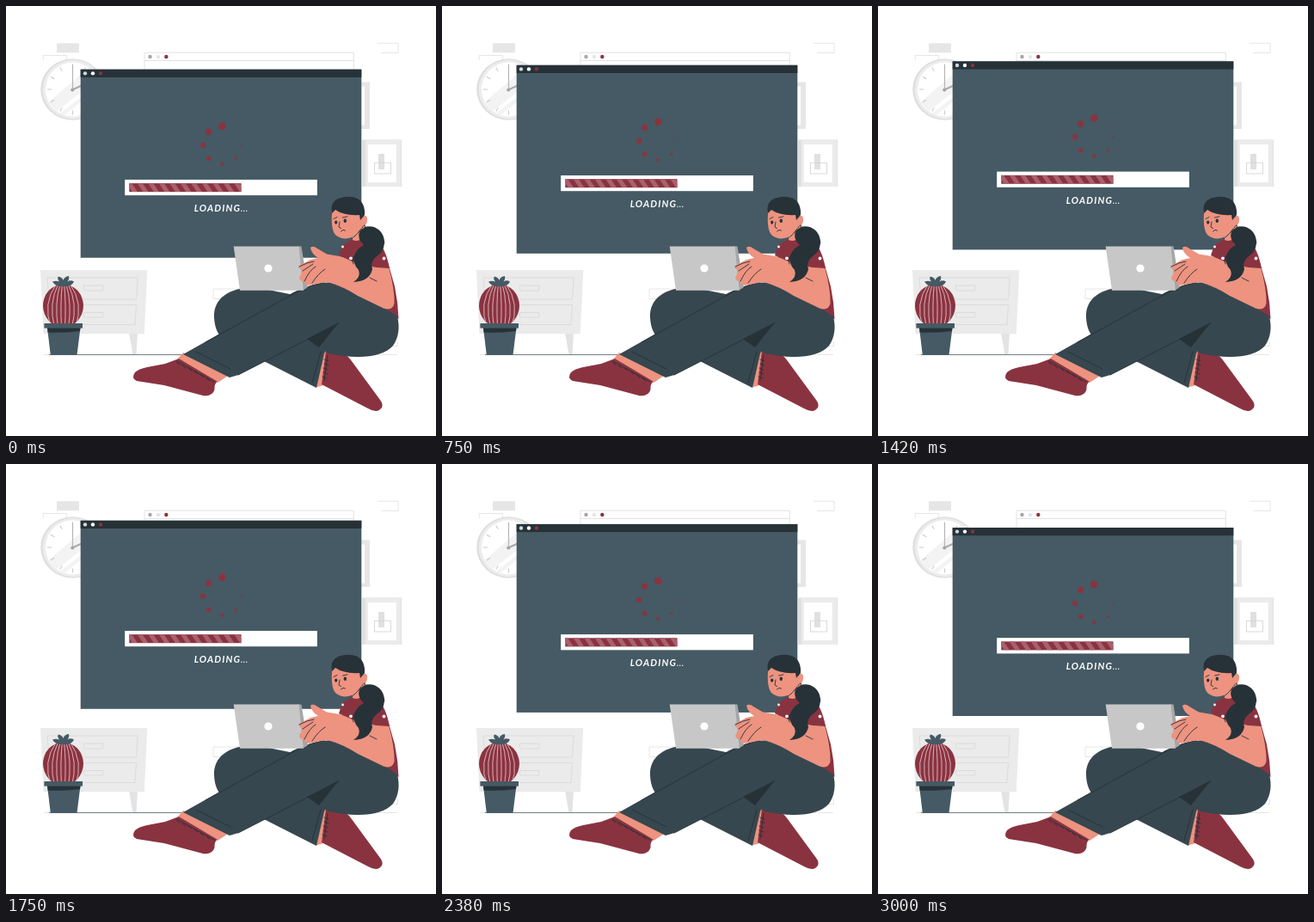
Write an HTML page that moves like this. It is 500 px wide and 500 px high and loops after 3040 ms.

```html
<!DOCTYPE html>
<html lang="en">
<head>
<meta charset="utf-8">
<title>Loading</title>
<style>
  html, body { margin: 0; width: 100%; height: 100%; overflow: hidden; background: #fff; }
  svg { display: block; width: 100vw; height: 100vh; }
  .red { fill: #8a3340; }
  .slate { fill: #455a64; }
  .ink { fill: #263238; }
  .pants { fill: #37474f; }
  .skin { fill: #ed9380; }
  .pale { fill: #ebebeb; }
  .white { fill: #fff; }
  .line { fill: none; stroke: #263238; stroke-width: .9; stroke-linecap: round; stroke-linejoin: round; }
  .faint { fill: none; stroke: #e0e0e0; stroke-width: .8; }
  .label { font: italic 700 11px Lato, "Open Sans", sans-serif; letter-spacing: 1.1px; fill: #fff; }
  .dots { font-weight: 400; letter-spacing: .3px; }
</style>
</head>
<body>
<svg viewBox="0 0 500 500">
  <defs>
    <clipPath id="face"><circle cx="77.5" cy="97" r="31"/></clipPath>
    <clipPath id="fill"><rect x="143.3" y="206.4" width="130.2" height="10"/></clipPath>
    <clipPath id="ball"><ellipse cx="66.5" cy="348.5" rx="23.5" ry="25"/></clipPath>
  </defs>

  <!-- wall -->
  <rect x="59" y="43.3" width="26" height="11" fill="#e6e6e6"/>
  <path class="faint" d="M43.3 63V57.5H70.7V63M432 43.3H456V54.5H436"/>
  <path class="faint" d="M272 340.5H241V329H272M455.5 390V395.5H446"/>

  <!-- clock -->
  <ellipse cx="77.5" cy="97" rx="37.3" ry="35.8" fill="#dfdfdf"/>
  <ellipse cx="78" cy="97" rx="35.3" ry="34.2" fill="#ededed"/>
  <circle class="white" cx="77.5" cy="97" r="31.5"/>
  <g clip-path="url(#face)" fill="#f3f3f3">
    <path d="M48 113L97 71L109 83L57 124Z"/>
    <path d="M60 127L112 87V92L64 130Z"/>
  </g>
  <g id="ticks" stroke="#c9c9c9" stroke-width="1"></g>
  <path d="M77.5 98V68" stroke="#b5b5b5" stroke-width="1.2"/>
  <path d="M77 97.5L89 92" stroke="#aaa" stroke-width="2"/>
  <circle cx="77.3" cy="97.5" r="2.1" fill="#a6a6a6"/>

  <!-- picture frames -->
  <rect x="400" y="88.5" width="23" height="54.5" fill="#e6e6e6"/>
  <rect class="white" x="400" y="93.5" width="17" height="45"/>
  <rect x="414" y="155.5" width="46" height="54.5" fill="#e0e0e0"/>
  <rect class="pale" x="418" y="155.5" width="41" height="54.5"/>
  <rect class="white" x="420.7" y="161" width="33" height="44"/>
  <rect x="433" y="172" width="7" height="18" fill="#e0e0e0"/>
  <rect x="428.5" y="182.3" width="19" height="12.7" fill="none" stroke="#d6d6d6" stroke-width=".9"/>

  <!-- back window -->
  <path d="M161 90V54.2H404.3V90M161 63.5H404.3" fill="#fff" stroke="#e0e0e0" stroke-width=".9"/>
  <circle cx="167.5" cy="59" r="2.2" fill="#a6a6a6"/>
  <circle cx="177" cy="59" r="2.2" fill="#e6e6e6"/>
  <circle class="red" cx="186.3" cy="59" r="2.2"/>

  <!-- dresser -->
  <path d="M143 380H153L151.5 405.3H147.5ZM49 380H58L56 405H52Z" fill="#e3e3e3"/>
  <path class="pale" d="M40 307H164.3L160.8 381.3H43.5Z"/>
  <path fill="none" stroke="#dadada" stroke-width=".9"
    d="M48 316H153.3L151.5 341H50ZM48.5 347.5H151.5L150 370.5H51ZM90 325H113L112.5 331H91ZM90 356.5H113L112.5 362H91Z"/>

  <path d="M44 405.5H455" stroke="#e0e0e0" stroke-width=".8"/>
  <path d="M50 405.5H400" stroke="#59656b" stroke-width=".8"/>

  <!-- cactus -->
  <ellipse class="red" cx="66.5" cy="348.5" rx="23.5" ry="25"/>
  <g id="ribs" clip-path="url(#ball)" fill="none" stroke="#e3bfc4" stroke-width=".9"></g>
  <path class="slate" d="M66.5 326Q58 327 54 320.5Q58 319 62 320.5Q59 317 61 314.5Q66 316 66.5 319Q68 314.5 73 314Q74 317 71.5 320.5Q75 318 79 320.5Q76 327 66.5 326Z"/>
  <path class="slate" d="M48 374H86.5L82.5 405.7H51.8Z"/>
  <path class="ink" d="M48 374H86.5L86 378Q65 380.5 48.6 379.6Z"/>
  <rect class="slate" x="44.4" y="369" width="44.6" height="5.6"/>

  <!-- floating window -->
  <g id="window">
    <rect class="slate" x="86.7" y="74" width="326.6" height="219"/>
    <rect class="ink" x="86.7" y="74" width="326.6" height="9.2"/>
    <circle cx="92" cy="78.6" r="2.2" fill="#cfd8dc"/>
    <circle class="white" cx="101" cy="78.6" r="2.2"/>
    <circle class="red" cx="110" cy="78.6" r="2.2"/>
    <g id="spinner" class="red"></g>
    <rect class="white" x="138.2" y="202.2" width="223.7" height="18.2"/>
    <rect class="red" x="143.3" y="206.4" width="130.2" height="10"/>
    <g id="stripes" clip-path="url(#fill)" fill="#a8616c"></g>
    <text class="label" x="218.8" y="239.2">LOADING<tspan class="dots">...</tspan></text>
  </g>

  <!-- far leg -->
  <path class="skin" d="M369 400L360 443.5L368 441.5L378 402Z"/>
  <path class="pants" d="M290 327C258 327 241 341 242 362C243 386 258 399 298 412L361 444L370 404L388 368L330 335Z"/>
  <path class="red" d="M372 401L392 404Q398 407 402 413L435 458Q441 466 433 470.5Q428 472 421 468L367 440Z"/>
  <path class="line" d="M374 406L370 436M370 411L375 413M370 416L375 418M369 421L374 423M369 426L374 428M368 431L373 433" stroke-width=".6"/>

  <!-- torso -->
  <path class="red" d="M391 278L408 268L430 271Q440 283 446 305L452 326Q456 345 456.5 364L420 346L410 302Z"/>

  <!-- near leg -->
  <path class="skin" d="M206 403L258 430L246 438L199 411Z"/>
  <path class="pants" d="M206 405L334 333Q358 321 381 321C404 324 425 340 455 361C458 373 457 385 450 395C438 409 408 411 375 404L350 388L270 429L260 432Z"/>
  <path class="ink" d="M350 387L387 368L364 397Z"/>
  <path class="line" d="M232 391L330 337Q350 325 370 321.5M221 402L261 422M366 402L356 438M270 429L387 369"/>
  <path class="red" d="M201 410L245.5 436.5Q242 440 242.5 446Q240 454.5 229 453L184 441L152 436Q145 433 150 426Q154 422 164 420L185 416Z"/>
  <path class="line" d="M199 413L242 437M198 414l4 3M205 418l4 3M212 421l4 3M219 425l4 3M226 429l4 3M233 433l4 3" stroke-width=".6"/>

  <!-- laptop -->
  <path fill="#a6a6a6" d="M339 279.5H343.5L351 327L345 330.7Z"/>
  <path fill="#c7c7c7" d="M264.7 279.5H340.5L345.8 330.7H272Z"/>
  <circle class="white" cx="305" cy="305" r="4.6"/>

  <!-- arm -->
  <path class="skin" d="M354 281Q357 278 362 282L373 288.5L388 291L424 301L445 304Q452 329 451.5 346Q449 355 439 351.5L409 337Q392 326 374 321Q364 322 357 324Q350 326 347 323L348 320Q342 321 341 316Q344 310 345 307Q339 306 341 302L354 295L363 293Q355 288 354 281Z"/>
  <path class="line" d="M341 303Q350 298 358 297M345 308L357 300M347 320Q353 307 360 303M356 322Q363 311 371 306M423 316L431 320"/>
  <path class="red" d="M391 278L387 290Q416 305 446 305Q441 280 430 271L408 268Z"/>
  <g class="white">
    <circle cx="401" cy="293.3" r="1.9"/>
    <circle cx="439.5" cy="293.5" r="1.9"/>
    <circle cx="391.5" cy="280" r="1.4"/>
  </g>

  <!-- head -->
  <path class="skin" d="M404 262L418 252L417 268Q411 275 403 272Z"/>
  <path class="skin" d="M379.5 236Q377 259 383 266Q391 273 402 269Q413 264 417 249L415 236Z"/>
  <ellipse class="skin" cx="416.3" cy="250" rx="3.6" ry="6.5" transform="rotate(14 416 250)"/>
  <path class="ink" d="M378.5 237Q378 224 394 222Q415 220 417 238V243L412 249L411 243Q393 244 383 237L379 241Z"/>
  <path class="ink" d="M411 262Q418 254 428 257Q440 262 440 276Q439 286 431 291Q423 297 426 306Q423 320 404 321Q413 315 410 307Q402 298 405 290Q409 281 416 278Q408 271 411 262Z"/>
  <path class="line" d="M414 258Q420 249 416 264M419 257Q437 259 440 275M404 269Q409 265 413 259M410 287Q400 292 404 300"/>
  <g class="ink">
    <ellipse cx="383.7" cy="251.6" rx="1.6" ry="2.1"/>
    <ellipse cx="394.3" cy="249.7" rx="1.7" ry="2.2"/>
  </g>
  <path class="line" stroke-width="1.2" d="M381 247.5L385 245.5M391.5 246L397 244.8M388 251L387 257L389.5 258.5M389.5 262Q392 259 394.5 261"/>
</svg>
<script>
const LOOP = 3040, LEAD = 40, RISE = 10;
const $ = id => document.getElementById(id);

function add(parent, tag, attrs) {
  const node = document.createElementNS("http://www.w3.org/2000/svg", tag);
  for (const key in attrs) node.setAttribute(key, attrs[key]);
  $(parent).append(node);
}

for (let i = 0; i < 12; i++) {
  add("ticks", "path", { d: "M77.5 67.5v5", transform: `rotate(${i * 30} 77.5 97)` });
}

// Spinner dots shrink counterclockwise from the top.
const dotRadii = [4.2, 3.6, 3.1, 2.7, 2.1, 1.6, 1, .4];
dotRadii.forEach((r, i) => {
  const a = -Math.PI / 2 - i * Math.PI / 4;
  add("spinner", "circle", { cx: 251.3 + 22.2 * Math.cos(a), cy: 162 + 22 * Math.sin(a), r });
});

for (let x = 127.5; x < 274; x += 12.5) {
  add("stripes", "path", { d: `M${x} 206h6l7 10.5h-6z` });
}

for (let i = -3.5; i <= 3.5; i++) {
  const top = 66.5 + i * 2.2;
  add("ribs", "path", { d: `M${top} 323Q${66.5 + i * 7} 346 ${66.5 + i * 4} 374` });
}

function draw(time) {
  const phase = (time + LEAD) % LOOP / LOOP;
  const lift = RISE * (1 - Math.abs(1 - 2 * phase));
  $("window").setAttribute("transform", `translate(0 ${-lift})`);
}

const start = performance.now();
function tick() {
  draw(performance.now() - start);
  requestAnimationFrame(tick);
}
tick();
</script>
</body>
</html>
```
